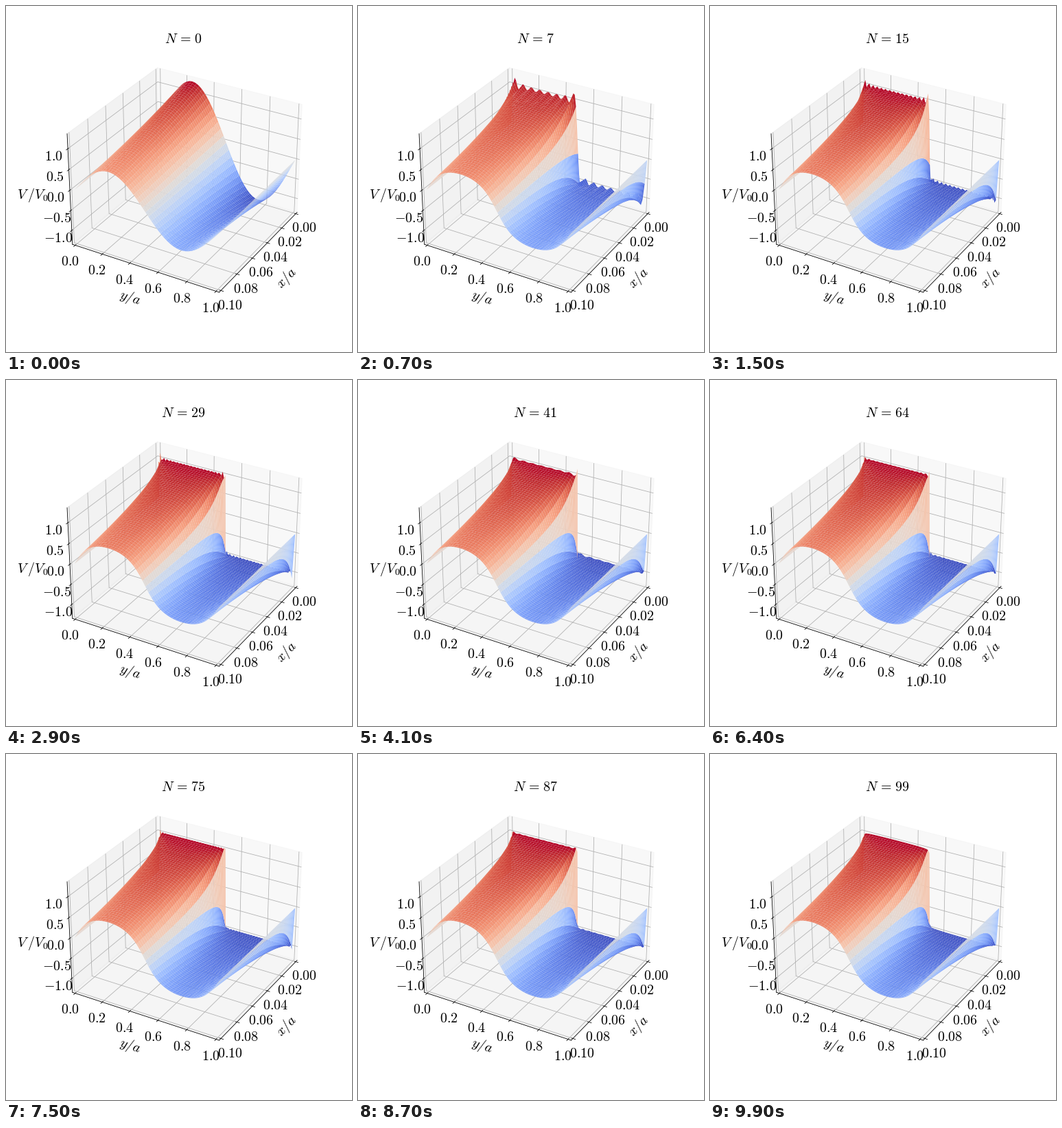
Write a matplotlib script that moves like this. It is 504 by 504 pixels and loops after 10 s.

```python
"""Fourier series solution of Laplace's equation in a slot, term by term."""
import numpy as np
import matplotlib.pyplot as plt
from matplotlib.animation import FuncAnimation
from matplotlib.collections import PolyCollection
from mpl_toolkits.mplot3d import proj3d

TERMS = 100
SAMPLES = 100
STRIDE = 2

plt.rcParams.update({
    "font.family": "Liberation Serif",
    "mathtext.fontset": "cm",
    "font.size": 20,
    "axes.titlesize": 20,
    "axes.labelsize": 20,
    "xtick.labelsize": 20,
    "ytick.labelsize": 20,
    "figure.subplot.bottom": 0.125,
})


class Sheet(PolyCollection):
    """Depth-sorted surface patches that are already projected to 2D."""

    def do_3d_projection(self):
        return 0


# Partial sums of V(x, y) for the boundary +1 on y < 1/2 and -1 on y > 1/2
x = np.linspace(0, 0.1, SAMPLES)
y = np.linspace(0, 1, SAMPLES)
X, Y = np.meshgrid(x, y)
n = 4 * np.arange(TERMS)[:, None] + 2
waves = 8 / (n * np.pi) * np.sin(n * np.pi * y)
decay = np.exp(-n * np.pi * x)
V = np.einsum("ki,kj->kij", waves, decay).cumsum(axis=0)

# Vertex indices around the perimeter of every patch
start = np.arange(0, SAMPLES - 1, STRIDE)
rows, cols = (g.reshape(-1, 1) for g in np.meshgrid(start, start, indexing="ij"))
last = SAMPLES - 1
ring_r = np.minimum(rows + [0, 0, 0, 1, 2, 2, 2, 1], last)
ring_c = np.minimum(cols + [0, 1, 2, 2, 2, 1, 0, 0], last)
ring = ring_r * SAMPLES + ring_c

fig = plt.figure(figsize=(7, 7), dpi=72)
ax = fig.add_subplot(projection="3d")
ax.view_init(elev=30, azim=30)


def padded(lo, hi):
    margin = (hi - lo) / 48
    return lo - margin, hi + margin


ax.set_xlim(*padded(0, 0.1))
ax.set_ylim(*padded(0, 1))
ax.set_zlim(*padded(-1.3, 1.3))


def label_ticks(axis, values, digits):
    axis.set_ticks(values, labels=[f"${v:.{digits}f}$" for v in values])
    plt.setp(axis.get_ticklabels(), va="top", ha="center")


label_ticks(ax.xaxis, np.linspace(0, 0.1, 6), 2)
label_ticks(ax.yaxis, np.linspace(0, 1, 6), 1)
label_ticks(ax.zaxis, np.linspace(-1, 1, 5), 1)

# The small \hspace values restore TeX's italic and relation spacing
ax.set_xlabel("$x/a$", labelpad=15)
ax.set_ylabel("$y/a$", labelpad=10)
ax.zaxis.set_rotate_label(False)
ax.set_zlabel(r"$V\hspace{0.222}/V_0$", labelpad=10)
title = ax.set_title("", y=1.0)
title.set_y(1.0)  # undo the lowering that 3D axes apply

sheet = Sheet([], edgecolors="none")
ax.add_collection(sheet, autolim=False)
view = ax.get_proj()


def update(k):
    z = V[k].ravel()
    px, py, pz = (np.asarray(p) for p in
                  proj3d.proj_transform(X.ravel(), Y.ravel(), z, view))
    order = np.argsort(-pz[ring].mean(axis=1), kind="stable")
    patches = ring[order]
    height = z[patches].mean(axis=1)
    shade = (height - height.min()) / np.ptp(height)
    sheet.set_verts(np.stack([px[patches], py[patches]], axis=-1))
    sheet.set_facecolor(plt.cm.coolwarm(shade))
    title.set_text(rf"$N\hspace{{0.187}}=\hspace{{0.078}}{k}$")
    return sheet, title


anim = FuncAnimation(fig, update, frames=TERMS, interval=100, repeat=True)
plt.show()
```
